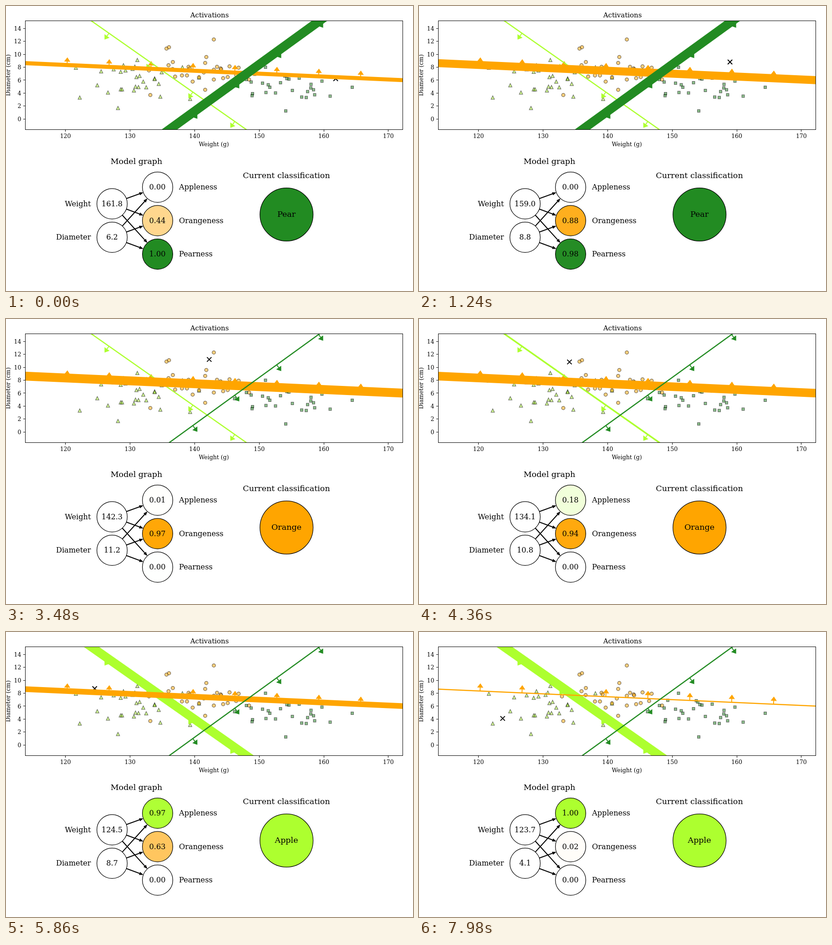
Write an HTML page with a canvas that moves like this. It is 894 by 626 pixels and loops after 8 s.

```html
<!DOCTYPE html>
<html lang="en">
<head>
<meta charset="utf-8">
<title>Activations</title>
<style>
html, body { margin: 0; width: 100%; height: 100%; overflow: hidden; background: #fff; }
canvas { display: block; width: 894px; height: 626px; }
</style>
</head>
<body>
<canvas id="stage" width="894" height="626"></canvas>
<script>
const ctx = document.getElementById('stage').getContext('2d');
const LOOP = 8000;
const BOX = { left: 42.5, top: 32.5, right: 871.5, bottom: 271.5 };
const MEAN = { w: 141.844, d: 6.225 };

// Each class has a decision line d = d0 + slope * (w - w0) and a sigmoid gain.
const CLASSES = [
  { name: 'Apple', rgb: '173,255,47', w0: 124.05, d0: 15.16, slope: -0.7017, gain: -0.5655, y: 398 },
  { name: 'Orange', rgb: '255,165,0', w0: 113.75, d0: 8.639, slope: -0.045, gain: 0.91, y: 471.5 },
  { name: 'Pear', rgb: '34,139,34', w0: 136.03, d0: -1.69, slope: 0.7243, gain: -0.664, y: 545 }
];

// Samples as x, y pairs on the stage.
const APPLES = [
  153.5,135.5, 162,201, 200.5,174, 209,143.5, 224,190, 236.5,139, 246,224, 252,144.5,
  252,183, 255,183, 258,130, 262.5,141.5, 278,138, 281,185.5, 283,133, 284.5,177,
  286.5,156, 288.5,118.5, 291,178, 293.5,153.5, 301.5,166, 308,178.5, 326.5,159,
  326.5,160.5, 335.5,171, 339,199, 342,145.5, 387.5,134.5, 404.5,204, 424,157
];
const ORANGES = [
  314,141.5, 317,195.5, 352.5,93.5, 358,90.5, 357,130, 366.5,123, 366,138.5, 371.5,155,
  386.5,152.5, 397.5,152.5, 401,133.5, 403.5,137, 410,166, 424,156.5, 434.5,146,
  437.5,125, 437.5,184, 440,112, 456.5,73.5, 456.5,140, 456.5,161.5, 463.5,133.5,
  471.5,137, 472.5,139, 477,158.5, 487,156, 491,132.5, 505.5,151.5, 511,135.5, 534,161.5
];
const PEARS = [
  502,175, 528,161.5, 538.5,167, 541.5,192.5, 540.5,197, 546.5,150, 563.5,169.5,
  570,134.5, 571,190, 576,173, 579.5,178.5, 592,191, 603,168.5, 609,151, 612.5,154,
  617,159.5, 621.5,160.5, 614.5,230.5, 629,185.5, 644,158.5, 649.5,200, 659.5,201,
  662.5,188, 669.5,180, 670,172, 675.5,184, 678,195, 694,165, 712,198, 760.5,178.5
];

const px = w => 130.6 + 14.185 * (w - 120);
const py = d => 248 - 14.18 * d;
const lineAt = (c, w) => c.d0 + c.slope * (w - c.w0);
const lineY = (c, x) => py(lineAt(c, 120 + (x - 130.6) / 14.185));
const activation = (c, w, d) => 1 / (1 + Math.exp(-c.gain * (d - lineAt(c, w))));

// Steps last 100, 20 and 20 ms in turn after a first one of 20 ms.
function stepAt(t) {
  if (t < 20) return 0;
  const u = t - 20, m = u % 140;
  return 1 + 3 * Math.floor(u / 140) + (m < 100 ? 0 : m < 120 ? 1 : 2);
}

function text(s, x, y, size, align = 'center') {
  ctx.font = size + 'px "DejaVu Serif", serif';
  ctx.textAlign = align;
  ctx.fillStyle = '#000';
  ctx.fillText(s, x, y);
}

function segment(x1, y1, x2, y2, width, color) {
  ctx.lineWidth = width;
  ctx.strokeStyle = color;
  ctx.beginPath();
  ctx.moveTo(x1, y1);
  ctx.lineTo(x2, y2);
  ctx.stroke();
}

function arrow(x, y, ux, uy, length, width, headLength, headHalf, color) {
  const tx = x + ux * length, ty = y + uy * length;
  const bx = tx - ux * headLength, by = ty - uy * headLength;
  segment(x, y, bx, by, width, color);
  ctx.fillStyle = color;
  ctx.beginPath();
  ctx.moveTo(tx, ty);
  ctx.lineTo(bx - uy * headHalf, by + ux * headHalf);
  ctx.lineTo(bx + uy * headHalf, by - ux * headHalf);
  ctx.fill();
}

function disc(x, y, r, fill) {
  ctx.beginPath();
  ctx.arc(x, y, r, 0, 2 * Math.PI);
  ctx.fillStyle = fill;
  ctx.fill();
  ctx.lineWidth = 1.25;
  ctx.strokeStyle = '#000';
  ctx.stroke();
}

function scatter(points, rgb, shape) {
  ctx.fillStyle = `rgba(${rgb},0.5)`;
  ctx.strokeStyle = 'rgba(0,0,0,0.55)';
  ctx.lineWidth = 1.25;
  for (let i = 0; i < points.length; i += 2) {
    ctx.beginPath();
    shape(points[i], points[i + 1]);
    ctx.closePath();
    ctx.fill();
    ctx.stroke();
  }
}

const circle = (x, y) => ctx.arc(x, y, 3.75, 0, 2 * Math.PI);
const square = (x, y) => ctx.rect(x - 2.8, y - 2.8, 5.6, 5.6);
function triangle(x, y) {
  ctx.moveTo(x, y - 3.75);
  ctx.lineTo(x + 3.75, y + 3.75);
  ctx.lineTo(x - 3.75, y + 3.75);
}

function drawLineArrows(c) {
  const slope = lineY(c, 1) - lineY(c, 0);
  const side = Math.sign(c.gain) / Math.hypot(1, slope);
  for (let k = 1; k <= 8; k++) {
    const x = 42 + 92.1 * k;
    arrow(x, lineY(c, x), slope * side, -side, 17, 2, 9.5, 6.8, `rgb(${c.rgb})`);
  }
}

function drawPlot(w, d, values) {
  const { left, top, right, bottom } = BOX;
  ctx.save();
  ctx.beginPath();
  ctx.rect(left, top, right - left, bottom - top);
  ctx.clip();
  scatter(APPLES, CLASSES[0].rgb, triangle);
  scatter(ORANGES, CLASSES[1].rgb, circle);
  scatter(PEARS, CLASSES[2].rgb, square);
  const x = px(w), y = py(d);
  segment(x - 5, y - 5, x + 5, y + 5, 1.9, '#000');
  segment(x - 5, y + 5, x + 5, y - 5, 1.9, '#000');
  CLASSES.forEach(drawLineArrows);
  CLASSES.forEach((c, i) => segment(0, lineY(c, 0), 894, lineY(c, 894),
    Math.max(2.5, 20 * values[i]), `rgb(${c.rgb})`));
  ctx.restore();

  ctx.lineWidth = 1;
  ctx.strokeStyle = '#000';
  ctx.strokeRect(left, top, right - left, bottom - top);
  for (let v = 120; v <= 170; v += 10) {
    const tx = Math.floor(px(v)) + 0.5;
    segment(tx, bottom, tx, bottom + 4.5, 1, '#000');
    text(v, px(v), 290, 12.5);
  }
  for (let v = 0; v <= 14; v += 2) {
    const ty = Math.floor(py(v)) + 0.5;
    segment(left - 4.5, ty, left, ty, 1, '#000');
    text(v, 33.5, py(v) + 4.6, 12.5, 'right');
  }
  text('Activations', 447, 25, 15);
  text('Weight (g)', 456.5, 308, 12.5);
  ctx.save();
  ctx.translate(9, 152);
  ctx.rotate(-Math.PI / 2);
  text('Diameter (cm)', 0, 0, 12.5);
  ctx.restore();
}

function drawGraph(w, d, values) {
  const inputs = [
    { name: 'Weight', value: w, y: 434.5 },
    { name: 'Diameter', value: d, y: 508 }
  ];
  text('Model graph', 286.5, 346.5, 17.5);
  for (const n of inputs) {
    for (const c of CLASSES) {
      const span = Math.hypot(100, c.y - n.y);
      const ux = 100 / span, uy = (c.y - n.y) / span;
      arrow(233 + ux * 33.3, n.y + uy * 33.3, ux, uy, span - 66.6, 2.1, 9, 3.5, '#000');
    }
    disc(233, n.y, 33.4, '#fff');
    text(n.value.toFixed(1), 233, n.y + 5, 16.2);
    text(n.name, 186.5, n.y + 5, 16.2, 'right');
  }
  CLASSES.forEach((c, i) => {
    disc(333, c.y, 33.4, `rgba(${c.rgb},${values[i].toFixed(4)})`);
    text(values[i].toFixed(2), 332.5, c.y + 5, 16.2);
    text(c.name + 'ness', 380, c.y + 5, 16.2, 'left');
  });
}

function drawResult(values) {
  const best = CLASSES[values.indexOf(Math.max(...values))];
  text('Current classification', 616, 378, 17.5);
  disc(616.2, 458, 58.4, `rgb(${best.rgb})`);
  text(best.name, 616, 463, 17.5);
}

function draw(t) {
  const angle = stepAt(t) * 2 * Math.PI / 300;
  const w = MEAN.w + 20 * Math.cos(angle);
  const d = MEAN.d + 5 * Math.sin(angle);
  const values = CLASSES.map(c => activation(c, w, d));
  ctx.fillStyle = '#fff';
  ctx.fillRect(0, 0, 894, 626);
  drawPlot(w, d, values);
  drawGraph(w, d, values);
  drawResult(values);
}

const start = performance.now();
function tick() {
  draw((performance.now() - start) % LOOP);
  requestAnimationFrame(tick);
}
tick();
</script>
</body>
</html>
```
